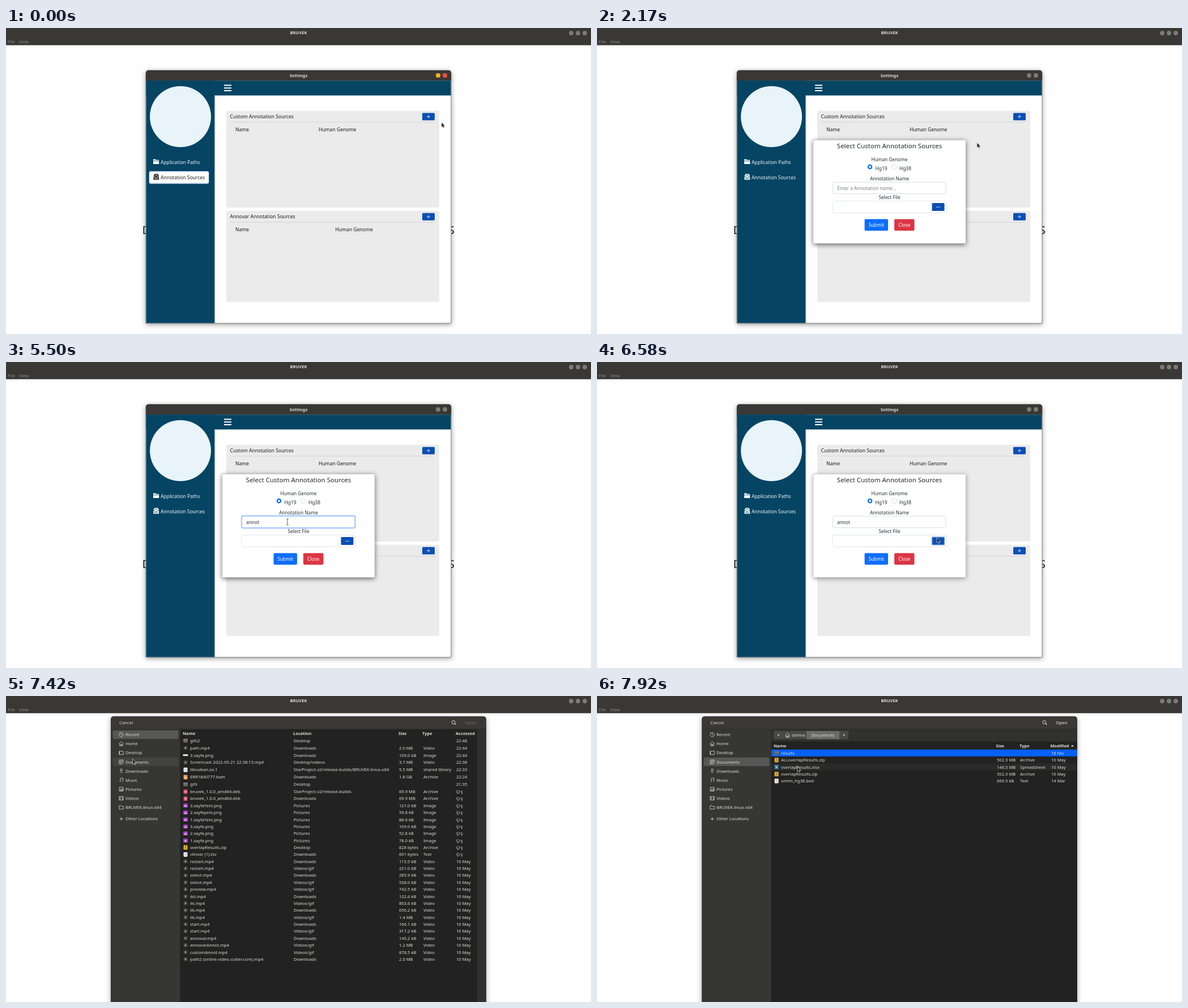
Write an HTML page that moves like this. It is 1033 by 542 pixels and loops after 8000 ms.

```html
<!DOCTYPE html>
<html lang="en">
<head>
<meta charset="utf-8">
<title>Annotation settings</title>
<style>
html, body { margin: 0; width: 100%; height: 100%; overflow: hidden; background: #fefefe; }
svg { display: block; width: 100vw; height: 100vh; }
text { font-family: "Noto Sans", "Open Sans", sans-serif; white-space: pre; }
</style>
</head>
<body>
<svg id="stage" viewBox="0 0 1033 542"></svg>
<script>
const FRAME = 1000 / 12, LOOP = 8000;
const BAR = '#393835', BLUE = '#054463', BUTTON = '#0b4fb3', PALE = '#dcdcd8';

const rect = (x, y, w, h, fill, rx = 0, extra = '') =>
  `<rect x="${x}" y="${y}" width="${w}" height="${h}" fill="${fill}" rx="${rx}" ${extra}/>`;
const dot = (x, y, r, fill, extra = '') => `<circle cx="${x}" cy="${y}" r="${r}" fill="${fill}" ${extra}/>`;
const path = (d, stroke, width = 1, fill = 'none') =>
  `<path d="${d}" stroke="${stroke}" stroke-width="${width}" fill="${fill}"/>`;
const text = (x, y, s, size, fill, extra = '') =>
  `<text x="${x}" y="${y}" font-size="${size}" fill="${fill}" ${extra}>${s}</text>`;
const group = (id, body, extra = '') => `<g id="${id}" ${extra}>${body}</g>`;
const MID = 'text-anchor="middle"', BOLD = 'font-weight="700"';

const plus = (x, y) => rect(x - 11, y - 6.5, 22, 13, BUTTON, 1.5) +
  path(`M${x - 3} ${y}h6M${x} ${y - 3}v6`, '#dfe9f8', .9);

function desktop() {
  return rect(0, 0, 1033, 542, '#fefefe') + rect(0, 0, 1033, 30.5, BAR) +
    text(516.5, 11.3, 'BRUVEK', 7.6, PALE, `${MID} ${BOLD}`) +
    [998, 1010, 1022].map(x => dot(x, 9, 3.9, '#7d7c78')).join('') +
    text(3, 27, 'File', 7.9, '#8b8a86') + text(23, 27, 'View', 7.9, '#8b8a86') +
    text(240.5, 364.5, 'D', 20, '#222') + text(792, 364.5, 'S', 20, '#222', 'text-anchor="end"');
}

function panel(y, h, title, genomeX) {
  return rect(389, y, 376, h, '#ebebeb', 3) +
    text(395.5, y + 13, title, 8.6, '#1c1c1c') +
    path(`M395 ${y + 20.3}H757`, '#d2d2d2', .9) + plus(746, y + 10.5) +
    text(405, y + 36.5, 'Name', 8.55, '#1c1c1c') +
    text(genomeX, y + 36.5, 'Human Genome', 8.55, '#1c1c1c');
}

const drawerIcon = (fill, gap) =>
  path('M262 258.5h6.5l1.6 4.5v6h-9.700v-6z', 'none', 0, fill) +
  path('M260.500 263.500h2.700l1 1.500h2.500l1-1.500h2.500M262.500 260.800h5.500M261.500 267.200h7.500', gap, .9);

function settings() {
  const frame = 'M247 523V80q0-5 5-5H781q5 0 5 5V523z';
  return `<path d="${frame}" fill="#fff" stroke="#5b5b58" stroke-width=".8" filter="url(#soft)"/>` +
    path('M247 93.500V80q0-5 5-5H781q5 0 5 5V93.500z', 'none', 0, BAR) +
    text(516.500, 87, 'Settings', 7.7, PALE, `${MID} ${BOLD}`) +
    rect(247.500, 93.300, 538, 26.200, BLUE) + rect(247.500, 93.300, 121, 429.300, BLUE) +
    rect(368.500, 119.500, 1.200, 403, '#c3cdd3') +
    [101.500, 106.300, 111].map(y => rect(385, y - 1, 13, 2, '#fff')).join('') +
    dot(308, 157, 54, '#e8f4f9') +
    path('M260 232.500h4l1 1.300h5.200v1.400h-10.200zM260 236h10.200v5h-10.200z', 'none', 0, '#fff') +
    text(273, 241, 'Application Paths', 8.5, '#f2f6f8') +
    panel(146.500, 171.500, 'Custom Annotation Sources', 552) +
    panel(323.800, 161.500, 'Annovar Annotation Sources', 581.500) +
    group('focused',
      rect(252.500, 253.500, 106, 22.500, '#fff', 3, 'stroke="#2c6cb0" stroke-width="1"') +
      drawerIcon('#222', '#fff') + text(273, 268, 'Annotation Sources', 8.5, '#222') +
      dot(763, 84, 4.1, '#f5b01c') + dot(775, 84, 4.1, '#ec4d45')) +
    group('blurred', drawerIcon('#fff', BLUE) +
      text(273, 268, 'Annotation Sources', 8.5, '#f2f6f8') +
      dot(763, 84, 3.9, '#7d7c78') + dot(775, 84, 3.9, '#7d7c78'));
}

function modal() {
  const label = (y, s) => text(516.500, y, s, 8.25, '#2a2e32', MID);
  const button = (x, w, fill, s) => rect(x, 338.500, w, 20.500, fill, 2) +
    text(x + w / 2, 352, s, 8.3, '#fff', MID);
  const content = text(516.500, 213, 'Select Custom Annotation Sources', 11.5, '#25292d', `${MID} font-weight="500"`) +
    label(236, 'Human Genome') + label(270, 'Annotation Name') + label(303, 'Select File') +
    dot(482, 246, 3.1, '#fff', 'stroke="#0d6efd" stroke-width="2.3"') +
    dot(525, 246, 4.2, '#fff', 'stroke="#c8ccd0" stroke-width=".7"') +
    text(491.500, 251.500, 'Hg19', 8.4, '#2a2e32') + text(534, 251.500, 'Hg38', 8.4, '#2a2e32') +
    rect(416.500, 273, 199.500, 20.500, '#fff', 2.5, 'id="input" stroke="#d5d9dd" stroke-width=".9"') +
    rect(416, 272.500, 200.500, 21.500, 'none', 2.5, 'id="ring" stroke="#a9ccfa" stroke-width="2.4"') +
    text(424, 286.500, '', 8.3, '#2a2e32', 'id="entry"') +
    rect(424, 279.500, .7, 9, '#222', 0, 'id="caret"') +
    rect(416, 306.500, 201.500, 21, '#fff', 2.5, 'stroke="#e0e3e6" stroke-width=".9"') +
    rect(591.500, 310, 22, 14, BUTTON, 1.5, 'id="browse" stroke="#7fa9e6" stroke-width="0"') +
    group('dots', [-2.500, 0, 2.500].map(d => dot(602.500 + d, 317.200, .75, '#fff')).join('')) +
    button(472.500, 41.500, '#0d6efd', 'Submit') + button(525, 35.500, '#dc3545', 'Close');
  return rect(382, 198.500, 269, 183, '#fff', 0, 'id="sheet" stroke="#bbb" stroke-width=".6"') +
    group('form', content);
}

const ICONS = {
  v: [rect, '#42423f', 7, 7, '<path d="M-1-1.700 1.500 0-1 1.700z" fill="#ccc"/>'],
  i: [rect, '#a63fc0', 8, 7, '<path d="M-2.500 2 0-1.500 2.500 2z" fill="#e7c8ef"/>'],
  s: [rect, '#eceae6', 9, 3, ''],
  d: [rect, '#cd4a66', 7, 8, '<circle r="1.500" fill="#f6d7dd"/>'],
  z: [rect, '#e3ad2b', 7, 8, '<path d="M0-3V2" stroke="#7b5a10"/>'],
  b: [rect, '#e8a05c', 7, 8, '<path d="M-2 1h4" stroke="#fff0df"/>'],
  t: [rect, '#efeeea', 7, 8, '<path d="M-2-1h4M-2 1h4" stroke="#aaa" stroke-width=".7"/>'],
  x: [rect, '#2d7f9c', 7, 8, '<path d="M-1.500-1.500l3 3m0-3l-3 3" stroke="#e5f1f5"/>'],
  f: [rect, '#69655f', 8, 7, '<path d="M-4-1.500h8" stroke="#8b867f"/>']
};
function fileIcon(kind, y) {
  const [shape, fill, w, h, mark] = ICONS[kind];
  return `<g transform="translate(317 ${y})">${shape(-w / 2, -h / 2, w, h, fill, .8)}${mark}</g>`;
}

function fileRows(rows, columns, rowY) {
  return rows.trim().split('\n').map((row, i) => {
    const [kind, ...cells] = row.split('|'), y = rowY(i);
    return fileIcon(kind, y) + cells.map((s, c) => text(columns[c], y + 2.7, s, 7.6, PALE)).join('');
  }).join('');
}
const headings = (y, list) => list.map(([x, s]) => text(x, y, s, 7.5, PALE, BOLD)).join('');

const RECENT = `
f|gifs2|Desktop|||22:48
v|path.mp4|Downloads|2.0 MB|Video|22:44
s|3.sayfa.png|Downloads|109.0 kB|Image|22:44
v|Screencast 2022-05-21 22:38:15.mp4|Desktop/videos|3.7 MB|Video|22:38
t|libvulkan.so.1|StarProject.v2/release-builds/BRUVEK-linux-x64|5.5 MB|shared library|22:33
b|ERR1840777.bam|Downloads|1.8 GB|Archive|22:24
f|gifs|Desktop|||21:35
d|bruvek_1.0.0_amd64.deb|StarProject.v2/release-builds|69.9 MB|Archive|Çrş
d|bruvek_1.0.0_amd64.deb|Downloads|69.9 MB|Archive|Çrş
i|3.sayfaYeni.png|Pictures|121.0 kB|Image|Çrş
i|2.sayfayeni.png|Pictures|59.8 kB|Image|Çrş
i|1.sayfaYeni.png|Pictures|88.6 kB|Image|Çrş
i|3.sayfa.png|Pictures|109.0 kB|Image|Çrş
i|2.sayfa.png|Pictures|52.8 kB|Image|Çrş
i|1.sayfa.png|Pictures|78.0 kB|Image|Çrş
z|overlapResults.zip|Desktop|828 bytes|Archive|Çrş
t|clinvar (1).tsv|Downloads|601 bytes|Text|Çrş
v|restart.mp4|Downloads|115.5 kB|Video|10 May
v|restart.mp4|Videos/gif|221.0 kB|Video|10 May
v|select.mp4|Downloads|285.9 kB|Video|10 May
v|select.mp4|Videos/gif|538.0 kB|Video|10 May
v|preview.mp4|Videos/gif|742.5 kB|Video|10 May
v|ikii.mp4|Downloads|132.6 kB|Video|10 May
v|iki.mp4|Videos/gif|803.6 kB|Video|10 May
v|ilk.mp4|Downloads|656.2 kB|Video|10 May
v|ilk.mp4|Videos/gif|1.4 MB|Video|10 May
v|start.mp4|Downloads|166.1 kB|Video|10 May
v|start.mp4|Videos/gif|317.2 kB|Video|10 May
v|annovar.mp4|Downloads|145.2 kB|Video|10 May
v|annovarAnnot.mp4|Videos/gif|1.2 MB|Video|10 May
v|customAnnot.mp4|Videos/gif|878.5 kB|Video|10 May
v|path2 (online-video-cutter.com).mp4|Downloads|2.0 MB|Video|10 May`;

const DOCUMENTS = `
f|results|||16 Nis
z|ALLoverlapResults.zip|502.3 MB|Archive|10 May
x|overlapResults.xlsx|146.5 MB|Spreadsheet|10 May
z|overlapResults.zip|502.3 MB|Archive|10 May
t|omim_hg38.bed|666.5 kB|Text|14 Mar`;

const HOUSE = 'M-4 0L0-3.800 4 0M-2.800-.5V3.500H2.800V-.5M-.8 3.500V1H.8V3.500';
const PLACES = [
  ['Recent', 'M-3.700 0a3.700 3.700 0 1 0 1-2.500M-3.500-3.500v1.500h1.500M0-2V0L1.500 1'],
  ['Home', HOUSE],
  ['Desktop', 'M-3.700-3H3.700V3H-3.700zM-3-2.500V2.500'],
  ['Documents', 'M-3.500-3.500H3.500V1.500L1.500 3.500H-3.500zM-2-1.500H2M-2 .3H2M-2 2H0'],
  ['Downloads', 'M-1.500-3.500H1.500V0H-1.500zM-2 1.500L0 3.500 2 1.500'],
  ['Music', 'M-1.500 2.500V-3L3-3.500V1.500M-3 2.500h1.500M1.500 1.800H3'],
  ['Pictures', 'M-3.500-3.300H3.500V3.300H-3.500zM-2.500 2L-.5-.5 1 1 2.500-1V2z'],
  ['Videos', 'M-3.700-3H3.700V3H-3.700zM-2-3V3M2-3V3'],
  ['BRUVEK-linux-x64', 'M-3.700-3H-.5L.5-1.800H3.700V3H-3.700z'],
  ['Other Locations', 'M-3 0H3M0-3V3']
];
const placeY = i => i === 9 ? 217.700 : 68.500 + i * 16.100;

function chooser() {
  const places = PLACES.map(([name, d], i) => text(211, placeY(i) + 2.700, name, 7.6, PALE) +
    `<path d="${d}" transform="translate(203.500 ${placeY(i)})" fill="none" stroke="${PALE}" stroke-width=".8"/>`).join('');
  const recent = rect(832, 58.500, 16, 484, '#30302e') +
    headings(68.700, [[312, 'Name'], [507, 'Location'], [693, 'Size'], [735, 'Type'], [794, 'Accessed']]) +
    fileRows(RECENT, [325, 508, 694, 737, 795], i => i < 8 ? 79 + 12.930 * i : 181.700 + 12.370 * (i - 8)) +
    text(820.500, 50, 'Open', 7.7, '#73726f', MID);
  const documents = rect(307.500, 58.500, 540.500, 22, '#30302e') +
    rect(312, 62, 132, 14.500, '#484845', 2) + rect(370, 62, 58, 14.500, '#6b6b68') +
    path('M321.500 67v4.500l-3-2.250zM435 67v4.500l3-2.250z', 'none', 0, '#bbb') +
    `<path d="${HOUSE}" transform="translate(336.500 69.500)" fill="none" stroke="${PALE}" stroke-width=".8"/>` +
    text(344, 72, 'demra', 7.6, PALE) + text(399, 72, 'Documents', 7.6, PALE, MID) +
    headings(90.500, [[312, 'Name'], [704.500, 'Size'], [746, 'Type'], [800.500, 'Modified']]) +
    path('M837 89.500h5l-2.500-3z', 'none', 0, PALE) +
    rect(308, 94.800, 540, 12.200, '#0560f8') + rect(308, 119.500, 540, 12.300, '#2a2a28') +
    fileRows(DOCUMENTS, [325, 706, 747, 802], i => 101 + 12.400 * i) +
    text(820.500, 50, 'Open', 7.7, '#f0f0ec', MID);
  return `<path d="M185 550V42q0-6 6-6H842q6 0 6 6V550z" fill="#242422" filter="url(#soft)"/>` +
    path('M185 58.500V42q0-6 6-6H842q6 0 6 6V58.500z', 'none', 0, BAR) +
    rect(185, 58.500, 122.500, 484, '#363634') +
    rect(188.500, 109, 116, 15, '#434341', 2, 'id="hover"') +
    rect(188.500, 61, 116, 15, '#575755', 2, 'id="place"') +
    text(200, 50, 'Cancel', 7.8, PALE) + places +
    dot(790, 46.500, 2.900, 'none', `stroke="${PALE}" stroke-width="1"`) + path('M792 48.500l2.700 2.700', PALE, 1.1) +
    group('recent', recent) + group('documents', documents);
}

const cursors =
  group('arrow', path('M0 0V9.200L2.200 7.300 3.700 10.500 5.200 9.800 3.800 6.700H6.500z', '#f4f4f4', .6, '#222')) +
  group('hand', path('M-.9.700Q0-.7.900.700V4.200Q5.500 4 5.700 6V8.200L4.700 10.500H.300L-2.600 6.800Q-2.500 5.200-.9 6.300z', '#fff', .9, '#333')) +
  group('beam', path('M-1.800-5.500Q0-5.500 0-4.500 0-5.500 1.800-5.500M0-4.500V4.500M-1.800 5.500Q0 5.500 0 4.500 0 5.500 1.800 5.500', '#444', .9));

document.getElementById('stage').innerHTML =
  `<filter id="soft" x="-10%" y="-10%" width="120%" height="120%"><feDropShadow dx="0" dy="2" stdDeviation="4" flood-opacity=".38"/></filter>
   <filter id="deep" x="-10%" y="-15%" width="120%" height="130%"><feDropShadow dx="0" dy="2" stdDeviation="4.500" flood-opacity=".6"/></filter>` +
  desktop() + settings() + group('modal', modal()) +
  group('tip', rect(753, 167.500, 22, 13.500, '#30302e', 1, 'stroke="#555"  stroke-width=".5"') +
    text(764, 177, 'Add', 7.7, '#e5e5e0', MID)) +
  group('chooser', chooser()) + group('cursor', cursors);

const $ = id => document.getElementById(id);
const show = (id, on) => $(id).setAttribute('visibility', on ? 'inherit' : 'hidden');
const set = (id, name, value) => $(id).setAttribute(name, value);

// Pointer stops: step, x, y
const TRACK = [[0, 769, 167], [1, 758, 165], [3, 741, 160], [5, 741, 160], [7, 744, 158], [10, 746, 157], [25, 746, 157],
  [26, 671, 203], [28, 560, 270], [30, 505, 291], [33, 486, 280], [35, 485.500, 279], [65, 485.500, 279],
  [68, 520, 292], [71, 588, 312], [73, 611, 316], [75, 603, 314], [76, 602, 313], [79, 600, 311],
  [81, 560, 290], [84, 340, 180], [86, 245, 122], [88, 223.500, 111.500], [91, 223.500, 111.500],
  [92, 240, 114], [94, 335, 122], [95, 353.500, 124.500]];

function pointer(step) {
  const next = TRACK.findIndex(k => k[0] >= step);
  if (next <= 0) return TRACK[0].slice(1);
  const [a, ax, ay] = TRACK[next - 1], [b, bx, by] = TRACK[next], p = (step - a) / (b - a);
  return [ax + (bx - ax) * p, ay + (by - ay) * p];
}

const within = (n, a, b) => n >= a && n < b;
const easeOut = p => 1 - (1 - Math.min(1, Math.max(0, p))) ** 3;
const grow = (id, p, cx, cy) =>
  set(id, 'transform', `translate(${cx} ${cy}) scale(1 ${easeOut(p)}) translate(${-cx} ${-cy})`);

function draw(step) {
  const typed = 'annot'.slice(0, [50, 51, 54, 55, 58].filter(k => step >= k).length);
  show('focused', step < 18);
  show('blurred', step >= 18);
  show('tip', within(step, 16, 18));

  show('modal', step >= 19);
  grow('modal', (step - 18) / 2, 516.500, 290);
  show('form', step >= 21);
  set('sheet', 'filter', step < 79 ? 'url(#deep)' : 'url(#soft)');
  show('ring', within(step, 37, 78));
  set('ring', 'opacity', Math.min(1, (step - 36) / 3));
  $('entry').textContent = typed || 'Enter a Annotation name...';
  set('entry', 'fill', typed ? '#2a2e32' : '#7b8188');
  show('caret', within(step, 37, 43) || within(step, 50, 66));
  set('caret', 'x', 424 + (typed ? $('entry').getComputedTextLength() : 0));
  set('browse', 'stroke-width', step >= 78 ? 1.500 : 0);
  show('dots', step < 76);

  show('chooser', step >= 80);
  grow('chooser', (step - 79) / 3, 516.500, 290);
  const opened = step >= 91;
  show('recent', !opened);
  show('documents', opened);
  show('hover', within(step, 88, 91));
  set('place', 'y', opened ? 109 : 61);

  const hand = within(step, 3, 18) || within(step, 72, 79);
  const beam = within(step, 31, 68);
  show('hand', hand);
  show('beam', beam);
  show('arrow', !hand && !beam);
  set('cursor', 'transform', `translate(${pointer(step)})`);
}

function tick() {
  draw(Math.floor((performance.now() % LOOP + 5) / FRAME) % 96);
  requestAnimationFrame(tick);
}
tick();
</script>
</body>
</html>
```
